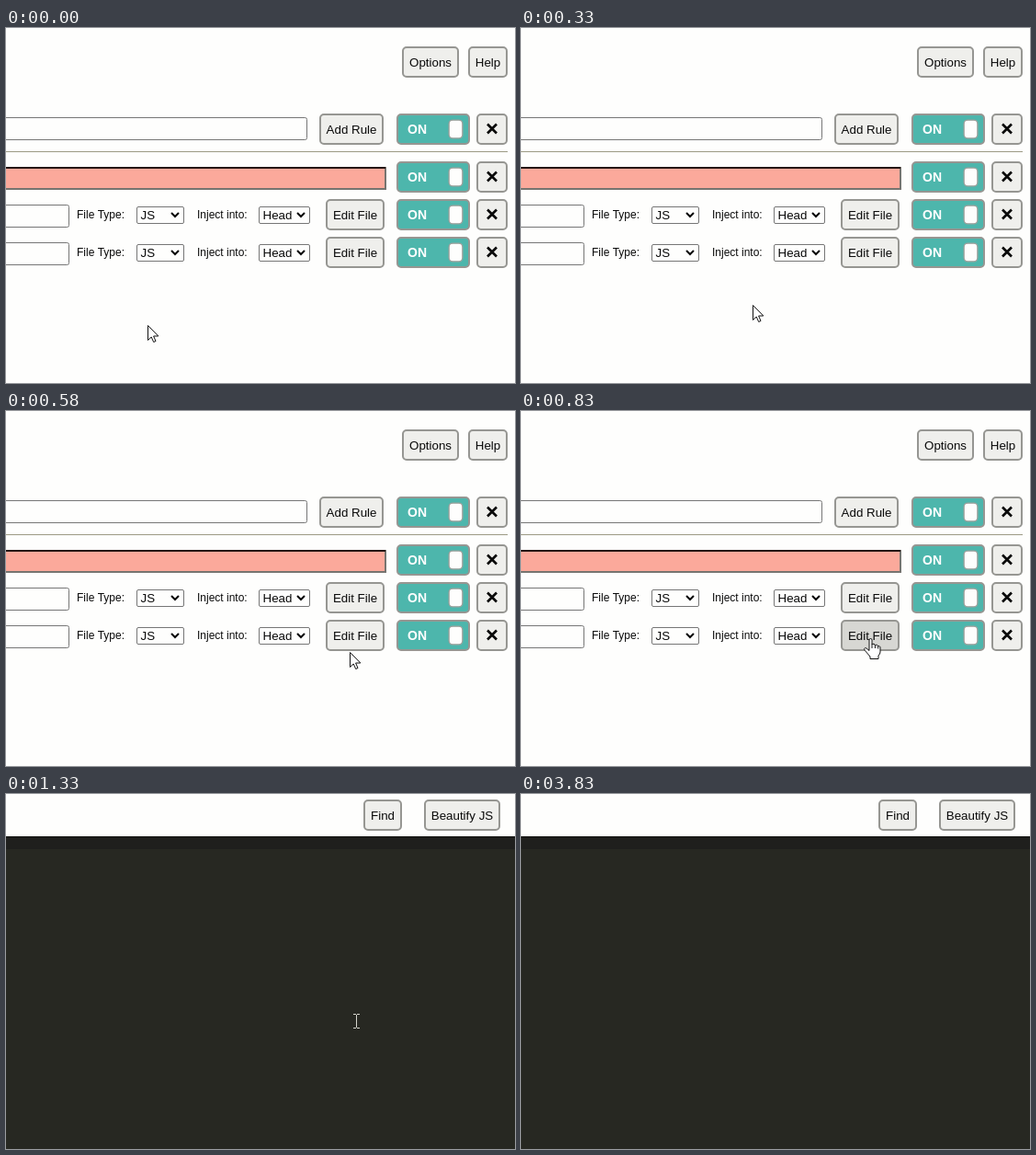
Write an HTML page with a canvas that moves like this. It is 554x386 px and loops after 4410 ms.

```html
<!DOCTYPE html>
<html lang="en">
<head>
<meta charset="utf-8">
<title>Rule list and editor</title>
<style>
html, body { margin: 0; width: 100%; height: 100%; overflow: hidden; background: #fefefd; }
canvas { display: block; width: 554px; height: 386px; }
</style>
</head>
<body>
<canvas id="stage" width="554" height="386"></canvas>
<script>
const canvas = document.getElementById('stage');
const ctx = canvas.getContext('2d');
const W = 554, H = 386, LOOP = 4410;
const FONT = '"Liberation Sans", Arial, sans-serif';
const PAGE = '#fefefd', EDGE = '#969692', FACE = '#efefec', HOVER = '#d7d7d3';
const TEAL = '#4db6ac', FIELD = '#767676', INK = '#0a0a0a';

// Pointer hot spot: time, x, y
const path = [
  [0, 154, 323], [80, 155, 323], [170, 161, 323], [250, 174, 321],
  [330, 252, 301], [420, 337, 273], [500, 364, 264], [580, 374, 262],
  [670, 379, 253], [750, 381, 248], [830, 381, 247]
];

const arrow = new Path2D('M.5 .5V16.5L4.2 13L6.7 18.5L9 17.5L6.6 12H11.8Z');
const hand = new Path2D('M-2 2Q-2 .5 -.5 .5Q1 .5 1 2V7Q1.5 6 3 6.3Q4.3 6.6 4.4 8' +
  'Q5 7 6.5 7.4Q7.7 7.8 7.7 9Q8.6 8 9.6 9Q10 9.5 10 11V15Q10 17 8 19V22.5H-1V20' +
  'L-6.6 13.5Q-8.3 11.3 -6.5 10.6Q-5.2 10.3 -2 13.5Z');

function text(str, x, y, size = 13.333, color = INK, weight = 'normal') {
  ctx.font = `${weight} ${size}px ${FONT}`;
  ctx.fillStyle = color;
  ctx.fillText(str, x, y);
}

function rect(x, y, w, h, color) {
  ctx.fillStyle = color;
  ctx.fillRect(x, y, w, h);
}

function box(x, y, w, h, r, line, fill, stroke) {
  ctx.beginPath();
  ctx.roundRect(x + line / 2, y + line / 2, w - line, h - line, r);
  ctx.fillStyle = fill;
  ctx.fill();
  ctx.lineWidth = line;
  ctx.strokeStyle = stroke;
  ctx.stroke();
}

function button(label, x, y, w, fill = FACE) {
  box(x, y, w, 34, 4, 2, fill, EDGE);
  ctx.textAlign = 'center';
  text(label, x + w / 2, y + 22);
  ctx.textAlign = 'left';
}

function stroke(points, width, color) {
  ctx.beginPath();
  points.forEach(([x, y], i) => i ? ctx.lineTo(x, y) : ctx.moveTo(x, y));
  ctx.lineWidth = width;
  ctx.strokeStyle = color;
  ctx.stroke();
}

function controls(y) {
  box(425, y, 80, 34, 4, 2, TEAL, EDGE);
  text('ON', 437, y + 22, 14, '#fff', 'bold');
  box(481.5, y + 6.5, 16, 21, 4, 1.3, PAGE, '#a0a09c');
  box(512, y, 34, 34, 4, 2, FACE, EDGE);
  stroke([[524, y + 11.5], [534, y + 21.5]], 2.6, INK);
  stroke([[534, y + 11.5], [524, y + 21.5]], 2.6, INK);
}

function select(label, x, y, w) {
  box(x, y, w, 19, 1.5, 1, PAGE, FIELD);
  text(label, x + 4.5, y + 14);
  const c = x + w - 10;
  stroke([[c - 4, y + 7], [c, y + 11], [c + 4, y + 7]], 2, INK);
}

function fileRow(y, hover) {
  box(-10, y + 6, 79, 25, 2, 1, PAGE, FIELD);
  text('File Type:', 77, y + 21, 12);
  select('JS', 142, y + 8, 52);
  text('Inject into:', 208, y + 21, 12);
  select('Head', 275, y + 8, 56);
  button('Edit File', 348, y, 64, hover ? HOVER : FACE);
  controls(y);
}

function pointer(x, y, over) {
  ctx.save();
  ctx.translate(x, y);
  const shape = over ? hand : arrow;
  ctx.fillStyle = '#fff';
  ctx.fill(shape);
  ctx.lineWidth = 1;
  ctx.strokeStyle = '#111';
  ctx.stroke(shape);
  if (over) {
    stroke([[1, 6.5], [1, 11]], 1, '#111');
    stroke([[4.4, 8], [4.4, 11]], 1, '#111');
    stroke([[7.7, 9], [7.7, 11.5]], 1, '#111');
  }
  ctx.restore();
}

function rules(t) {
  const [, x, y] = path.filter(p => p[0] <= t).pop();
  const over = x >= 348 && x < 412 && y >= 227 && y < 261;
  button('Options', 431, 20, 62);
  button('Help', 503, 20, 43);
  box(-10, 97, 338, 25, 2, 1, PAGE, FIELD);
  button('Add Rule', 341, 93, 70);
  controls(93);
  rect(0, 134, 546, 1, '#9c9a84');
  rect(0, 151, 414, 25, '#fba99b');
  rect(0, 174, 414, 2, '#767470');
  rect(412, 151, 2, 25, '#767470');
  rect(0, 151, 413, 2, '#241412');
  controls(145);
  fileRow(186, false);
  fileRow(227, over);
  pointer(x, y, over);
}

function editor(t) {
  button('Find', 389, 6, 42);
  button('Beautify JS', 455, 6, 83);
  rect(0, 46, W, H - 46, '#272822');
  rect(0, 46, W, 14, '#1f1f1d');
  rect(0, 46, W, 1, '#0c0c0a');
  if (t < 3830) {
    const beam = '#d6d6ce';
    rect(381, 240, 1, 14, beam);
    for (const y of [239, 254]) {
      rect(378, y, 3, 1, beam);
      rect(382, y, 3, 1, beam);
    }
  }
}

function draw(now) {
  const t = now % LOOP;
  rect(0, 0, W, H, PAGE);
  if (t < 1250) rules(t);
  else editor(t);
}

let start;
function tick(now) {
  start ??= now;
  draw(now - start);
  requestAnimationFrame(tick);
}
draw(0);
requestAnimationFrame(tick);
</script>
</body>
</html>
```
